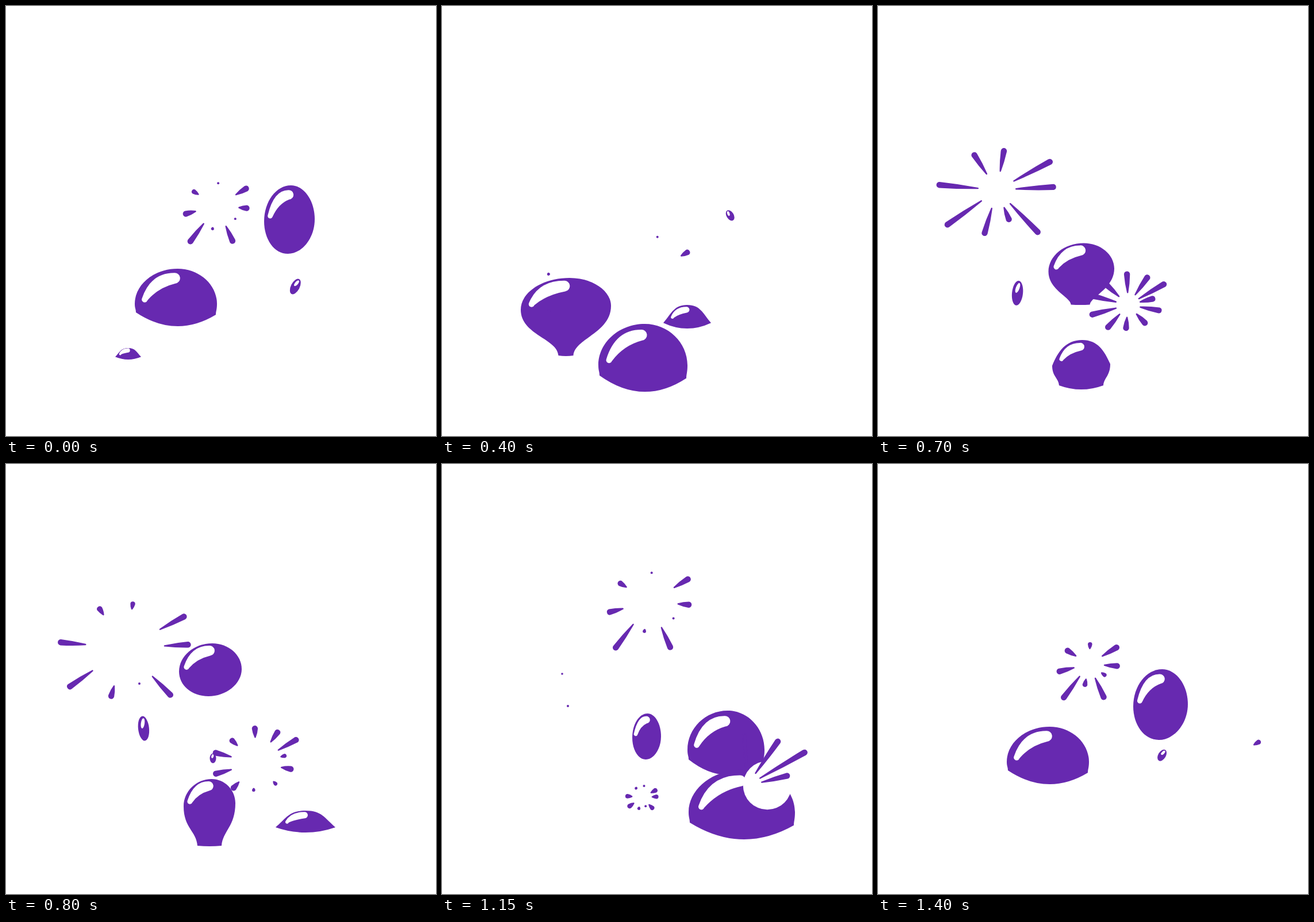
Animation of 748x748 px, one loop 1450 ms. Source, as an HTML page:

```html
<!DOCTYPE html>
<html lang="en">
<head>
<meta charset="utf-8">
<title>Bubbling</title>
<style>
html, body { margin: 0; width: 100%; height: 100%; overflow: hidden; background: #fff; }
svg { display: block; width: 100vw; height: 100vh; }
</style>
</head>
<body>
<svg viewBox="0 0 748 748"><g id="stage" fill="#6729b0"></g></svg>
<script>
const LOOP = 1450, STEP = 50, BURST = 300, INK = '#6729b0';
const stage = document.getElementById('stage');
const mix = (a, b, k) => a + (b - a) * k;
const n = v => v.toFixed(1);
const path = (...parts) => parts.map(p => typeof p === 'number' ? n(p) : p).join(' ');
const dot = (x, y, r) => `<circle cx="${n(x)}" cy="${n(y)}" r="${n(r)}"/>`;

// Each pose is built from centre, width, top and height. All share one vector,
// so any two can be blended:
// x0 x1 top leftY rightY topX lean baseL baseR baseLY baseRY bottom handleX handleY
function dome(cx, w, top, h) {
  const x0 = cx - w / 2, mid = top + h * .61, base = top + h * .78;
  return [x0, x0 + w, top, mid, mid, cx + w * .02, 0, x0 + 2, x0 + w - 2,
    base - h * .02, base + h * .02, top + h, 0, h * -.06];
}
function lens(cx, w, top, h) {
  const x0 = cx - w / 2, base = top + h * .76;
  return [x0, x0 + w, top, base, base, cx, w * .18, x0, x0 + w, base, base, top + h, 0, 0];
}
function neck(cx, w, top, h, half, flare = -2) {
  const x0 = cx - w / 2, mid = top + h * .38, base = top + h;
  return [x0, x0 + w, top, mid + h * .03, mid - h * .02, cx + w * .04, 0,
    cx - half, cx + half, base, base, base + 1, flare, h * -.22];
}
function free(cx, w, top, h) {
  const x0 = cx - w / 2, mid = top + h * .51, base = top + h;
  return [x0, x0 + w, top, mid + w * .02, mid - w * .02, cx + w * .03, 0,
    cx - w * .03, cx - w * .03, base, base, base, w * -.275, 0];
}
const isX = i => [0, 1, 5, 7, 8].includes(i);
const isFree = v => v[7] === v[8];

// A new bubble is a small copy of its first pose, resting on the same ground.
const seed = v => v.map((p, i) =>
  [6, 12, 13].includes(i) ? p * .35 : mix(isX(i) ? (v[0] + v[1]) / 2 : v[11], p, .35));

function moveTo(v, x, y) {
  const dx = x - (v[0] + v[1]) / 2, dy = y - (v[2] + v[11]) / 2;
  return v.map((p, i) => [6, 12, 13].includes(i) ? p : p + (isX(i) ? dx : dy));
}

function shine(x0, w, top, h, lean) {
  const l = lean / w, r = 9.8 * (1 - Math.exp(-w / 50)) * (1 - l * 2), s = r * .5;
  const x = x0 + w * .48, y = top + h * .27;
  const tx = x0 + (.12 + l * .4) * w, ty = top + (.87 - l * 1.1) * h;
  const dx = x - tx, dy = ty - y;
  return `<path fill="#fff" d="${path('M', tx - s, ty - s * .3,
    'Q', tx + dx * .2, y - r, x, y - r, 'A', r, r, '0 0 1', x + r * .2, y + r,
    'Q', tx + dx * .45, y + r + dy * .2, tx + s, ty + s * .5,
    'A', s, s, '0 0 1', tx - s, ty - s * .3, 'Z')}"/>`;
}

function body(v, bitten) {
  const [x0, x1, top, ly, ry, tx, lean, bl, br, bly, bry, bottom, hx, hy] = v;
  const w = x1 - x0, k = .55;
  const d = path('M', bl, bly,
    'C', bl + hx, bly + hy, x0, mix(ly, bly, k), x0, ly,
    'C', x0 + lean, mix(ly, top, k), mix(tx, x0, k), top, tx, top,
    'C', mix(tx, x1, k), top, x1 - lean, mix(ry, top, k), x1, ry,
    'C', x1, mix(ry, bry, k), br - hx, bry + hy, br, bry,
    'Q', (bl + br) / 2, 2 * bottom - (bly + bry) / 2, bl, bly, 'Z');
  const bite = `<g fill="#fff">${dot(x0 + w * .74, mix(top, bottom, .23), w * .228)}</g>`;
  return `<path d="${d}"/>` + shine(x0, w, top, (ly + ry) / 2 - top, lean) + (bitten ? bite : '');
}

// Born at a time, blended through its poses, gone at "end".
// A free bubble floats on to its popping point.
function bubble(birth, poses, end, popX, popY) {
  const [, last] = poses[poses.length - 1];
  const keys = [[birth, seed(poses[0][1])], ...poses,
    [end - STEP, isFree(last) ? moveTo(last, popX, popY) : last]];
  return t => {
    if (t < birth || t >= end) return '';
    let i = 0;
    while (i < keys.length - 2 && t >= keys[i + 1][0]) i++;
    const [[ta, a], [tb, b]] = [keys[i], keys[i + 1]];
    const k = tb > ta ? Math.min(1, (t - ta) / (tb - ta)) : 1;
    return body(a.map((p, j) => mix(p, b[j], k)), t >= end - STEP);
  };
}

// Ray tips of the three kinds of burst, as angle (degrees) and distance.
const wide = [[-123, 68], [-80, 65], [-28, 96], [-3, 91], [46, 94], [68, 53], [106, 73], [145, 97], [185, 93]];
const fan = [[-92, 88], [-55, 95], [-30, 116], [-14, 74], [10, 90], [47, 72], [95, 68],
  [132, 86], [165, 105], [194, 105], [223, 84]];
const low = [[-148, 49], [-87, 38], [-31, 61], [4, 54], [35, 37], [66, 68], [101, 41], [127, 78], [166, 58]];

// Tips drift out while a circle eats the rays from inside, shortest first.
function burst(start, cx, cy, scale, tips) {
  const rim = 1.15 * scale * tips.reduce((sum, tip) => sum + tip[1], 0) / tips.length;
  return t => {
    const k = (t - start) / BURST;
    if (k < 0 || k >= 1) return '';
    const inner = rim * (.22 + .35 * k + k * k);
    return tips.map(([deg, dist]) => {
      const outer = dist * scale * (.95 + .33 * k), a = deg * Math.PI / 180;
      const ux = Math.cos(a), uy = Math.sin(a);
      if (outer - inner > 4) return ray(cx, cy, ux, uy, inner, outer);
      return inner - outer < rim * .1 ? dot(cx + ux * outer, cy + uy * outer, 2) : '';
    }).join('');
  };
}

function ray(cx, cy, ux, uy, inner, outer) {
  const len = outer - inner;
  const r = Math.max(.8, Math.min(5, 1.5 + len * .18) - 1);
  const at = (d, side) => [cx + ux * d - uy * side, cy + uy * d + ux * side];
  const head = outer - r - 1, belly = mix(inner, head, .5);
  return `<path stroke="${INK}" stroke-width="2.4" stroke-linejoin="round" d="${path(
    'M', ...at(inner + 1, 0), 'Q', ...at(belly, r * .8), ...at(head, r),
    'A', r, r, '0 0 0', ...at(head, -r), 'Q', ...at(belly, -r * .8), ...at(inner + 1, 0), 'Z')}"/>`;
}

// A droplet sways upwards, swells and shrinks, then leaves two specks.
function drop(start, end, x0, y0, x1, y1, size, sway) {
  return t => {
    if (t < start || t >= end + 200) return '';
    if (t >= end) return size > 20 ? dot(x1 - 5, y1 - 28, 1.8) + dot(x1 + 5, y1 + 28, 2) : '';
    const k = (t - start) / (end - start), swell = Math.sin(Math.PI * k);
    const x = mix(x0, x1, k) + sway * swell, y = mix(y0, y1, k * (1.25 - .25 * k));
    const h = size / 2 * Math.sqrt(swell), w = (3 + size * .15) * Math.sqrt(Math.sqrt(swell));
    return `<g transform="translate(${n(x)} ${n(y)}) rotate(${n(sway * Math.cos(Math.PI * k))})">
      <ellipse rx="${n(w)}" ry="${n(h)}"/>
      <ellipse fill="#fff" cx="${n(-w * .28)}" cy="${n(-h * .4)}" rx="${n(w * .34)}" ry="${n(h * .42)}" transform="rotate(14)"/></g>`;
  };
}

const bubbles = [], bursts = [];
function add(birth, poses, end, popX, popY, scale, tips) {
  bubbles.push(bubble(birth, poses, end, popX, popY));
  bursts.push(burst(end - STEP, popX, popY, scale, tips));
}

// right: behind, upper, lower
add(350, [[400, lens(426.5, 83, 520, 41)], [600, dome(427, 100, 494, 72)]], 700, 435, 520, .66, fan);
add(950, [[1150, dome(494, 134, 429, 112)], [1400, free(491.5, 95, 357, 123)],
  [1450, free(493, 88, 312, 119)]], 1600, 492, 290, .94, wide);
add(750, [[800, lens(521, 104, 603, 38)], [1150, dome(521.5, 185, 531, 122)]],
  1200, 530, 560, 1.1, fan.slice(0, 4));
// left: on the ground, floating
add(1200, [[1400, dome(295.5, 143, 457, 100)]], 1650, 308, 497, 1, fan);
add(-100, [[0, lens(212.5, 45, 595, 20)], [200, dome(215, 158, 489, 133)],
  [400, neck(215.5, 157, 473, 135, 13)], [600, free(215.5, 141, 295, 122)]], 700, 207, 320, 1.13, wide);
// centre: first, and the second out of the same puddle
add(150, [[200, lens(348, 90, 622, 37)], [400, dome(349.5, 155, 553, 118)],
  [600, neck(352, 120, 513, 122, 33, 28)], [800, free(355.5, 109, 312, 92)]], 1050, 362, 240, 1.2, low);
add(500, [[600, lens(353, 112, 614, 55)], [800, neck(354, 90, 548, 116, 21)],
  [1150, free(356, 50, 434, 80)]], 1350, 367, 348, .94, low);

const scene = [
  ...bubbles,
  drop(1340, 1900, 482, 530, 493, 352, 38, 33),
  drop(500, 1000, 230, 590, 214, 393, 44, 20),
  drop(700, 900, 354, 585, 358, 455, 17, 4),
  ...bursts,
  burst(1000, 348, 580, .28, wide)
];

function draw(time) {
  const t = Math.floor(time % LOOP / STEP) * STEP;
  stage.innerHTML = scene.map(part => part(t) || part(t + LOOP)).join('');
}

const began = performance.now();
function tick() {
  draw(performance.now() - began);
  requestAnimationFrame(tick);
}
tick();
</script>
</body>
</html>
```
